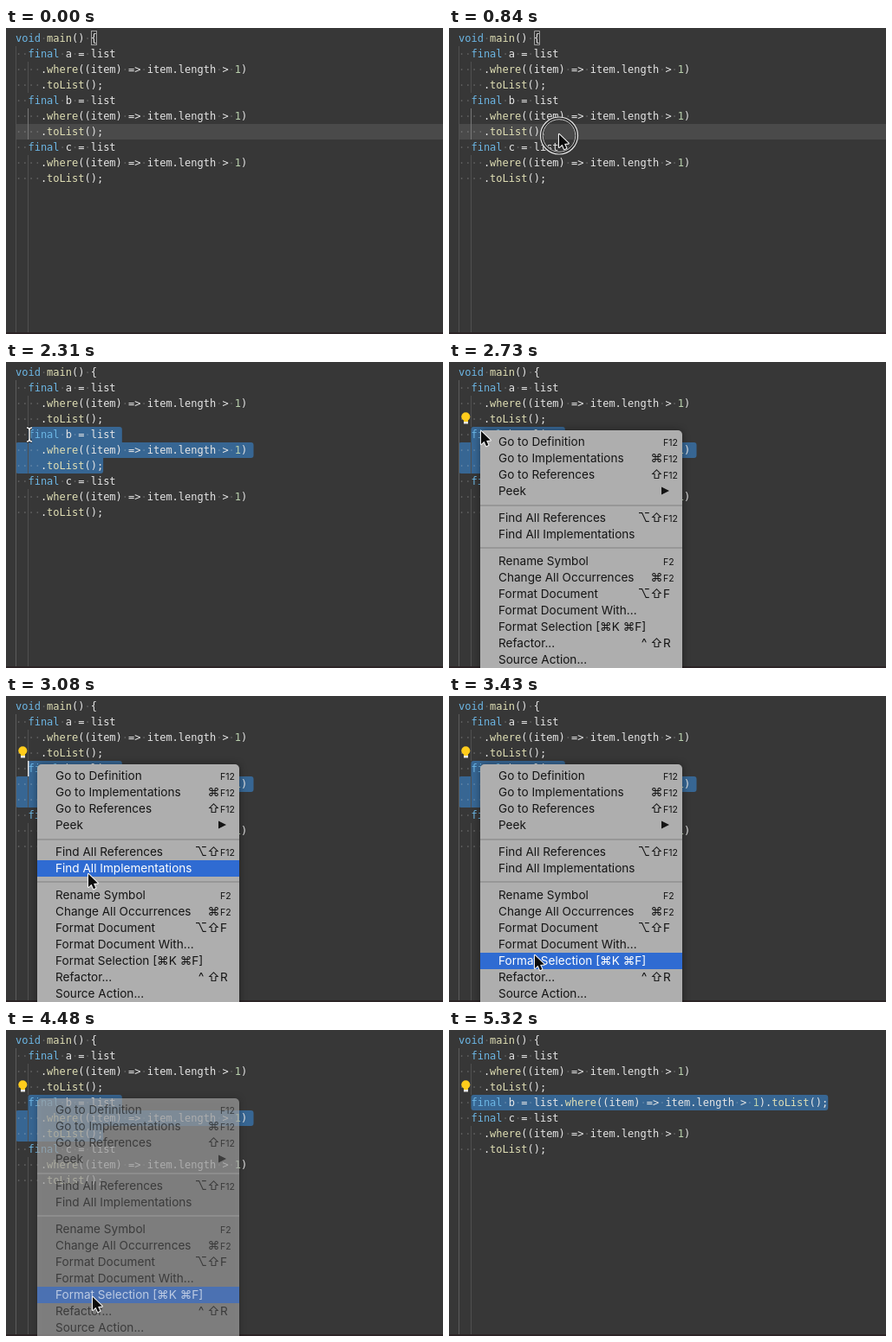
An HTML page with a canvas for the animation above (5.53 s loop, 504x354 px).

```html
<!DOCTYPE html>
<html lang="en">
<head>
<meta charset="utf-8">
<title>Format selection</title>
<style>
  html, body { margin: 0; width: 100%; height: 100%; overflow: hidden; background: #373737; }
  canvas { display: block; width: 504px; height: 354px; }
</style>
</head>
<body>
<canvas id="stage" width="504" height="354"></canvas>
<script>
const W = 504, H = 354, LOOP = 5530, STEP = 70;
const ctx = document.getElementById('stage').getContext('2d');

const MONO = '12px "DejaVu Sans Mono", monospace';
const UI = 'Inter, "DejaVu Sans", sans-serif';
const X0 = 11, COL = 7.224, ROW = 18, TOP = 3;
const SELECTION = '#376693';

const T = { press: 770, release: 980, select: 1820, bulb: 2520, menu: 2660,
            fade: 4410, gone: 4690, format: 4900, hide: 5180 };

const WHERE = '.where((item) => item.length > 1)', TO_LIST = '.toList();';
const broken = name => [`  final ${name} = list`, '    ' + WHERE, '    ' + TO_LIST];
const BEFORE = ['void main() {', ...broken('a'), ...broken('b'), ...broken('c')];
const AFTER = ['void main() {', ...broken('a'),
               '  final b = list' + WHERE + TO_LIST, ...broken('c')];

// [label, centre y, modifiers, key]
const ITEMS = [
  ['Go to Definition', 92, '', 'F12'],
  ['Go to Implementations', 111, '⌘', 'F12'],
  ['Go to References', 130, '⇧', 'F12'],
  ['Peek', 149, '', '▶'],
  ['Find All References', 180, '⌥⇧', 'F12'],
  ['Find All Implementations', 199, '', ''],
  ['Rename Symbol', 230, '', 'F2'],
  ['Change All Occurrences', 249, '⌘', 'F2'],
  ['Format Document', 268, '⌥⇧', 'F'],
  ['Format Document With...', 287, '', ''],
  ['Format Selection [⌘K ⌘F]', 306, '', ''],
  ['Refactor...', 325, '^⇧', 'R'],
  ['Source Action...', 344, '', '']
];
const MENU = { x: 36, y: 79, w: 233 };

// Pointer path: [time, x, y]
const PATH = [
  [70, 101, 310], [560, 127, 123], [1120, 127, 123], [1680, 27, 84],
  [2400, 27, 84], [2600, 35, 78], [2730, 37, 80], [3080, 95, 206],
  [3430, 99, 300], [3640, 100, 309], [LOOP, 100, 309]
];

const colX = c => X0 + c * COL;
const rowY = r => TOP + r * ROW;
const ease = u => u * u * (3 - 2 * u);

function pointerAt(t) {
  let i = 1;
  while (i < PATH.length - 1 && t > PATH[i][0]) i++;
  const [t0, x0, y0] = PATH[i - 1], [t1, x1, y1] = PATH[i];
  const u = ease(Math.min(1, Math.max(0, (t - t0) / (t1 - t0))));
  return [x0 + (x1 - x0) * u, y0 + (y1 - y0) * u];
}

function rect(color, x, y, w, h) {
  ctx.fillStyle = color;
  ctx.fillRect(x, y, w, h);
}

function rounded(color, x, y, w, h, r) {
  ctx.fillStyle = color;
  ctx.beginPath();
  ctx.roundRect(x, y, w, h, r);
  ctx.fill();
}

function text(str, x, y, color, font) {
  ctx.font = font;
  ctx.fillStyle = color;
  ctx.fillText(str, x, y);
}

function tokenColor(s) {
  if (/^(void|final)$/.test(s)) return '#6cb6e4';
  if (/^(main|where|toList)$/.test(s)) return '#dfdeb4';
  return /^\d$/.test(s) ? '#b9d0ad' : '#e6e6e6';
}

function drawCode(lines) {
  lines.forEach((line, r) => {
    const y = rowY(r) + 13;
    for (const m of line.matchAll(/\w+|\s|[^\w\s]+/g)) {
      const space = m[0] === ' ';
      text(space ? '·' : m[0], colX(m.index), y,
           space ? 'rgba(230,230,230,0.22)' : tokenColor(m[0]), MONO);
    }
  });
}

function drawGuides(formatted, selected) {
  const guide = (c, from, to, color = '#505050') =>
    rect(color, Math.floor(colX(c)), rowY(from), 1, rowY(to) - rowY(from));
  const end = 20;
  guide(0, 1, end, selected ? '#5c5c5c' : '#505050');
  guide(2, 2, 4);
  if (!formatted) guide(2, 5, 7, selected ? '#505050' : '#787878');
  guide(2, formatted ? 6 : 8, end);
}

function drawSelection(formatted) {
  if (formatted) {
    rounded(SELECTION, colX(2), rowY(4), 57 * COL, ROW, 3);
    return;
  }
  rounded(SELECTION, colX(2), rowY(4), 15 * COL, ROW, [3, 3, 0, 0]);
  rounded(SELECTION, X0, rowY(5), 38 * COL, ROW, [3, 3, 3, 0]);
  rounded(SELECTION, X0, rowY(6), 14 * COL, ROW, [0, 0, 3, 3]);
}

function drawBulb() {
  ctx.fillStyle = '#ffcc1c';
  ctx.beginPath();
  ctx.arc(19.3, 63.2, 5, 0, 7);
  ctx.fill();
  rect('#ffcc1c', 17, 66, 5, 3);
  rect('#e8e8e8', 17, 69, 5, 2.5);
}

function drawMenu(hoverY, alpha) {
  ctx.globalAlpha = alpha;
  ctx.shadowColor = 'rgba(0,0,0,0.4)';
  ctx.shadowBlur = 8;
  rounded('#aeaeae', MENU.x, MENU.y, MENU.w, H, 5);
  ctx.shadowBlur = 0;
  ctx.shadowColor = 'transparent';
  for (const y of [165, 214]) rect('#979797', MENU.x, y, MENU.w, 2);

  for (const [label, y, mods, key] of ITEMS) {
    const on = Math.abs(hoverY - y) <= 9.5;
    if (on) rect('#2f6bd2', MENU.x, y - 9, MENU.w, 19);
    const color = on ? '#fff' : '#141414';
    text(label, 57, y + 5, color, '13.6px ' + UI);
    [...mods].reverse().forEach((m, i) => {
      ctx.textAlign = 'center';
      text(m, 239.5 - i * 14.5, y + 5, color, '14px ' + UI);
      ctx.textAlign = 'left';
    });
    if (key === '▶') {
      ctx.fillStyle = color;
      ctx.beginPath();
      ctx.moveTo(245, y - 4.5);
      ctx.lineTo(254, y);
      ctx.lineTo(245, y + 4.5);
      ctx.fill();
    } else {
      text(key, 247, y + 5, color, (key.length > 1 ? '10.5px ' : '13.6px ') + UI);
    }
  }
  ctx.globalAlpha = 1;
}

function drawArrow(x, y) {
  const shape = [[0, 0], [0, 15], [3.6, 11.8], [6, 17.2], [8.4, 16.1], [6.1, 10.9], [10.8, 10.6]];
  ctx.beginPath();
  shape.forEach(([dx, dy]) => ctx.lineTo(x + dx, y + dy));
  ctx.closePath();
  ctx.lineJoin = 'round';
  ctx.lineWidth = 2.2;
  ctx.strokeStyle = '#f2f2f2';
  ctx.stroke();
  ctx.fillStyle = '#0c0c0c';
  ctx.fill();
}

function drawBeam(x, y) {
  ctx.beginPath();
  for (const s of [-1, 1]) {
    ctx.moveTo(x - 3, y + 8 * s);
    ctx.quadraticCurveTo(x, y + 8 * s, x, y + 5 * s);
    ctx.quadraticCurveTo(x, y + 8 * s, x + 3, y + 8 * s);
  }
  ctx.moveTo(x, y - 6);
  ctx.lineTo(x, y + 6);
  ctx.lineWidth = 3;
  ctx.strokeStyle = '#1c1c1c';
  ctx.stroke();
  ctx.lineWidth = 1.5;
  ctx.strokeStyle = '#f4f4f4';
  ctx.stroke();
}

function drawRing(x, y) {
  for (const [r, w, color] of [[20, 4, '#2a2a2a'], [21.5, 1.2, '#e8e8e8'], [18.8, 1, '#c4c4c4']]) {
    ctx.beginPath();
    ctx.arc(x, y, r, 0, 7);
    ctx.lineWidth = w;
    ctx.strokeStyle = color;
    ctx.stroke();
  }
}

function draw(t) {
  const selected = t >= T.select, formatted = t >= T.format;
  const [px, py] = pointerAt(t);

  rect('#373737', 0, 0, W, H);
  if (selected) drawSelection(formatted);
  else rect('#4a4a4a', X0, rowY(6), W, ROW);
  drawGuides(formatted, selected);
  drawCode(formatted ? AFTER : BEFORE);

  if (!selected) {
    ctx.lineWidth = 1;
    ctx.strokeStyle = '#a0a0a0';
    ctx.strokeRect(98.5, 3.5, 6, 16);
  }
  if (selected && Math.floor((t - 2800) / 500) % 2 === 0) {
    rect('#e8e8e8', 25, rowY(4), 1.5, ROW);
  }
  if (t >= T.bulb) drawBulb();
  rect('#2c2426', 0, 352, W, 2);

  const open = t >= T.menu && t < T.gone;
  if (open) drawMenu(py, Math.min(1, 1 - 1.5 * (t - T.fade) / (T.gone - T.fade) * 0.98));

  if (t < STEP || t >= T.hide) return;
  if (t >= T.press && t < T.release) drawRing(px, py + 1.5);
  if (t > 1190 && t < T.menu) drawBeam(px, py);
  else drawArrow(px, py);
}

const start = performance.now();
function tick() {
  const t = (performance.now() - start) % LOOP;
  draw(Math.min(5320, Math.floor(t / STEP) * STEP));
  requestAnimationFrame(tick);
}
draw(0);
tick();
</script>
</body>
</html>
```
